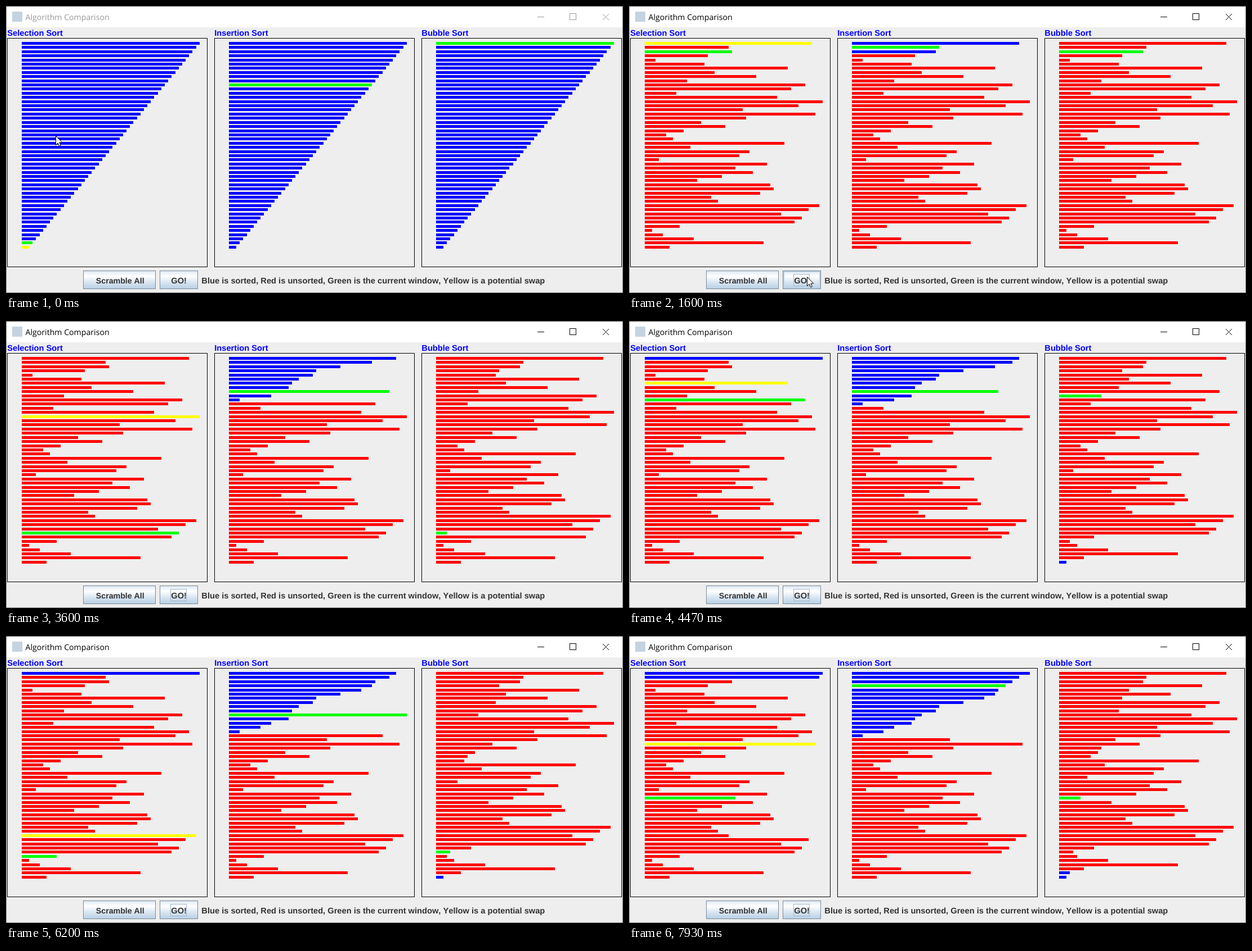
Write an HTML page that moves like this. It is 1096 px wide and 511 px high and loops after 8000 ms.

```html
<!DOCTYPE html>
<html lang="en">
<head>
<meta charset="utf-8">
<title>Algorithm Comparison</title>
<style>
  html, body { margin: 0; width: 100%; height: 100%; overflow: hidden; background: #eee; }
  svg { display: block; }
  text { font: bold 14.67px "Liberation Sans", Arial, sans-serif; font-kerning: none; text-rendering: geometricPrecision; fill: #333; }
  .label { fill: #00f; }
  .title { font: 14.15px "Open Sans", "Noto Sans", sans-serif; fill: #000; }
  .chrome { fill: none; stroke: #000; }
  .inactive .chrome { stroke: #999; }
  .inactive .title { fill: #999; }
  .face { fill: url(#ocean); stroke: #7a8a99; }
  .glow { fill: none; stroke: #b8cfe5; stroke-width: 2; visibility: hidden; }
  .focus { fill: none; stroke: #a3b8cc; visibility: hidden; }
  .hover .glow, .focused .focus { visibility: visible; }
  .pressed .face { fill: #b8cfe5; }
  .crisp { shape-rendering: crispEdges; }
</style>
</head>
<body>
<svg id="stage" width="1096" height="511" viewBox="0 0 1096 511">
  <defs>
    <linearGradient id="ocean" x2="0" y2="1">
      <stop offset="0" stop-color="#dde8f3"/>
      <stop offset=".3" stop-color="#fff"/>
      <stop offset=".6" stop-color="#dde8f3"/>
      <stop offset="1" stop-color="#b8cfe5"/>
    </linearGradient>
  </defs>
  <rect width="1096" height="511" fill="#eee"/>
  <rect width="1096" height="38" fill="#fff"/>
  <rect x=".5" y=".5" width="1095" height="510" fill="none" stroke="#777"/>
  <path d="M0 .5H1096" stroke="#4a4a44"/>
  <rect x="11" y="10" width="18" height="18" fill="#c5d3e0"/>
  <text class="title" x="34.5" y="24.5">Algorithm Comparison</text>
  <path class="chrome crisp" d="M944 19.5H956M1001.500 13.500H1012.500V24.500H1001.500Z"/>
  <path class="chrome" d="M1060 14L1071 25M1071 14L1060 25"/>
  <g id="panels" class="crisp"></g>
  <g id="scramble">
    <rect class="face" x="137.500" y="471.500" width="128" height="32"/>
    <rect class="glow" x="139" y="473" width="125" height="29"/>
    <rect class="focus" x="159.500" y="477.500" width="86" height="21"/>
    <text x="159.800" y="494" style="font-size:14.2px">Scramble All</text>
  </g>
  <g id="go">
    <rect class="face" x="273.500" y="471.500" width="67" height="32"/>
    <rect class="glow" x="275" y="473" width="64" height="29"/>
    <rect class="focus" x="292.500" y="477.500" width="28" height="21"/>
    <text x="293.300" y="494">GO!</text>
  </g>
  <text x="347.300" y="494">Blue is sorted, Red is unsorted, Green is the current window, Yellow is a potential swap</text>
  <path id="cursor" d="M.5 .5V16.500L4.200 13L6.700 18.700L9.200 17.600L6.800 12H11.800Z" fill="#fff" stroke="#000"/>
</svg>
<script>
const LOOP = 8000, FRAME = 1000 / 15, SIZE = 50;
const RED = '#f00', BLUE = '#00f', GREEN = '#0f0', YELLOW = '#ff0';
const PRESS = 10, SCRAMBLE = 12, GO_PRESS = 20, START = 22;

const shuffled = [
  46, 22, 23, 16, 1, 15, 39, 18, 30, 10, 44, 40, 7, 36, 49, 42, 26, 47, 27, 14, 21, 9, 4, 6, 38,
  11, 28, 25, 2, 33, 24, 29, 20, 13, 34, 35, 31, 17, 19, 48, 45, 37, 43, 41, 8, 0, 3, 12, 32, 5
];
const sorted = shuffled.map((_, i) => SIZE - 1 - i);

// cursor: frame, x, y
const path = [
  [0, 88, 231], [9, 200, 484], [12, 200, 484], [20, 316, 482], [26, 316, 482], [32, 330, 520]
];

const $ = id => document.getElementById(id);

function add(parent, tag, attrs, text) {
  const el = document.createElementNS(parent.namespaceURI, tag);
  for (const key in attrs) el.setAttribute(key, attrs[key]);
  if (text) el.textContent = text;
  return parent.appendChild(el);
}

function makePanel(name, left, width) {
  const root = $('panels');
  add(root, 'text', { class: 'label', x: left + 0.3, y: 53 }, name);
  add(root, 'rect', { x: left + 0.5, y: 57.5, width, height: 407, fill: 'none', stroke: '#000' });
  add(root, 'rect', { x: left, y: 56.5, width: width + 1, height: 1, fill: '#000' });
  return sorted.map((_, row) =>
    add(root, 'rect', { x: left + 26, y: Math.round(64 + 7.405 * row), height: 5 }));
}

const panels = [
  makePanel('Selection Sort', 2, 355),
  makePanel('Insertion Sort', 370, 355),
  makePanel('Bubble Sort', 738, 355)
];

function paint(bars, values, color) {
  bars.forEach((bar, row) => {
    bar.setAttribute('width', Math.round(13 + 6.18 * values[row]));
    bar.setAttribute('fill', color(row));
  });
}

function swap(a, i, j) { [a[i], a[j]] = [a[j], a[i]]; }

// Each sort runs until the given tick and returns its values and row colours.
function selection(tick) {
  const a = shuffled.slice();
  for (let i = 0; i < SIZE; i++) {
    let best = i;
    for (let j = i; j < SIZE; j++) {
      if (tick-- <= 0) {
        return [a, r => r === j ? GREEN : r === best ? YELLOW : r < i ? BLUE : RED];
      }
      if (a[j] > a[best]) best = j;
    }
    swap(a, i, best);
  }
}

function insertion(tick) {
  const a = shuffled.slice();
  for (let i = 1; i < SIZE; i++) {
    for (let j = i; j >= 0; j--) {
      if (tick-- <= 0) return [a, r => r === j ? GREEN : r <= i ? BLUE : RED];
      if (j === 0 || a[j - 1] > a[j]) break;
      swap(a, j, j - 1);
    }
  }
}

function bubble(tick) {
  const a = shuffled.slice();
  for (let end = SIZE - 1; end > 0; end--) {
    for (let j = 0; j < end; j++) {
      if (tick-- <= 0) return [a, r => r === j ? GREEN : r > end ? BLUE : RED];
      if (a[j] < a[j + 1]) swap(a, j, j + 1);
    }
  }
}

function drawBars(frame) {
  const [sel, ins, bub] = panels;
  if (frame < SCRAMBLE) {
    paint(sel, sorted, r => r === 48 ? GREEN : r === 49 ? YELLOW : BLUE);
    paint(ins, sorted, r => r === 10 ? GREEN : BLUE);
    paint(bub, sorted, r => r === 0 ? GREEN : BLUE);
  } else if (frame < START) {
    panels.forEach(bars => paint(bars, shuffled, () => RED));
  } else {
    const step = 2.52 + (frame - 24) * 1.317;
    const slow = 2.27 + (frame - 24) * 0.875;
    const lag = step < 49 ? 0 : step < 99 ? 0.94 : 0.5;
    paint(sel, ...selection(Math.floor(step)));
    paint(ins, ...insertion(Math.floor(slow)));
    paint(bub, ...bubble(Math.floor(step - lag)));
  }
}

function cursorAt(frame) {
  const next = path.findIndex(p => p[0] > frame);
  if (next < 0) return path[path.length - 1].slice(1);
  const [f0, x0, y0] = path[next - 1], [f1, x1, y1] = path[next];
  const k = (frame - f0) / (f1 - f0);
  return [x0 + (x1 - x0) * k, y0 + (y1 - y0) * k];
}

function drawButton(id, x, y, left, right, pressed, focused) {
  const hover = x >= left && x < right && y >= 471 && y < 504;
  const list = $(id).classList;
  list.toggle('hover', hover && !pressed);
  list.toggle('pressed', pressed);
  list.toggle('focused', focused);
}

function draw(frame) {
  const [x, y] = cursorAt(frame);
  $('stage').classList.toggle('inactive', frame < PRESS);
  $('cursor').setAttribute('transform', `translate(${Math.round(x)} ${Math.round(y)})`);
  drawButton('scramble', x, y, 137, 266,
    frame >= PRESS && frame < SCRAMBLE, frame >= PRESS && frame < GO_PRESS);
  drawButton('go', x, y, 273, 341,
    frame >= GO_PRESS && frame < START, frame >= GO_PRESS);
  drawBars(frame);
}

let shown = -1;
const began = performance.now();
function tick() {
  const t = (performance.now() - began) % LOOP;
  const frame = Math.min(119, Math.floor((t + 4) / FRAME));
  if (frame !== shown) draw(shown = frame);
  requestAnimationFrame(tick);
}
tick();
</script>
</body>
</html>
```
